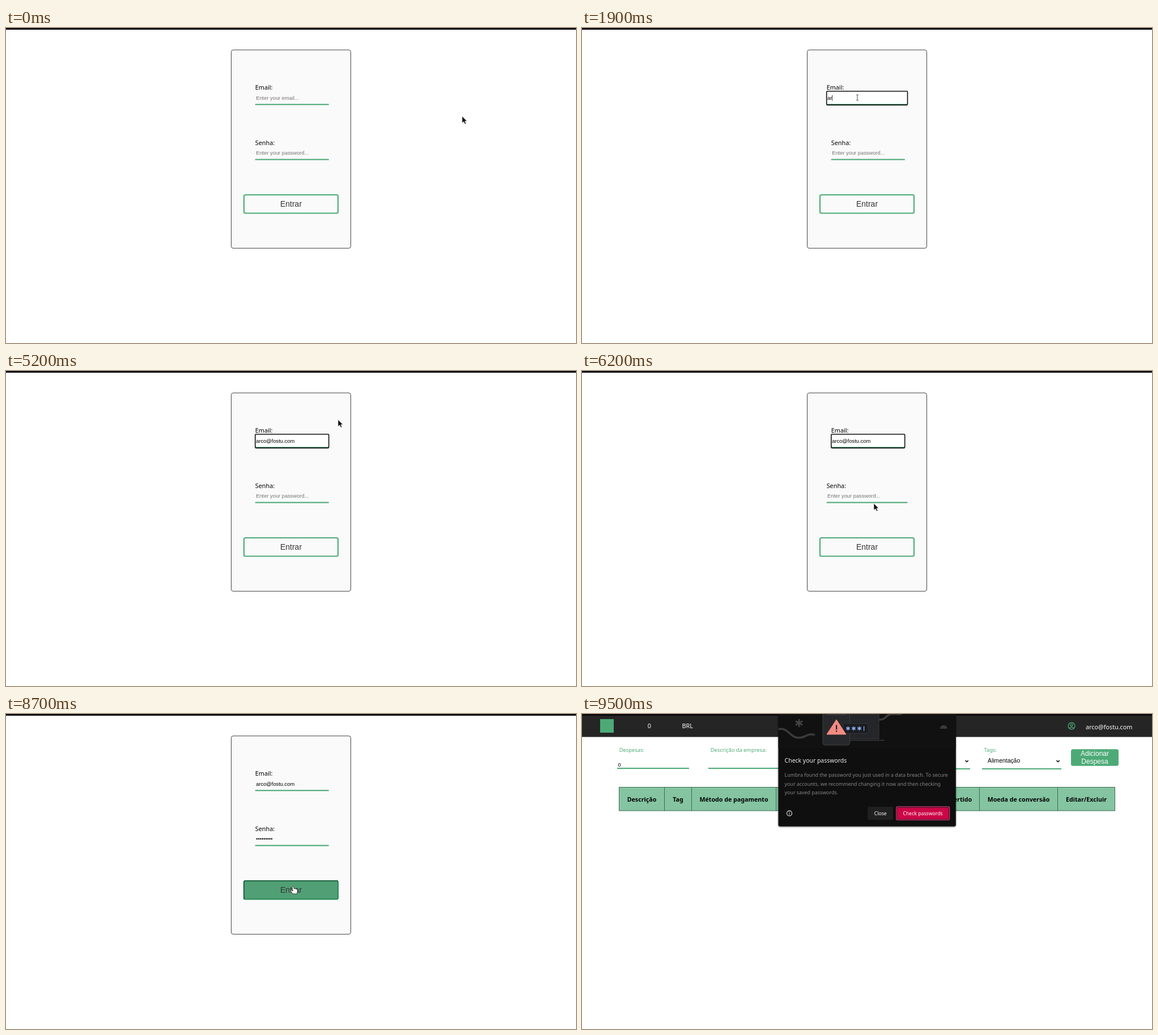
These frames come from a looping animation (1006x557 px, 9600 ms). An HTML page:

```html
<!DOCTYPE html>
<html lang="pt-BR">
<head>
<meta charset="utf-8">
<style>
html, body { margin: 0; width: 100%; height: 100%; overflow: hidden; background: #fff; }
svg { display: block; font-family: "Noto Sans", sans-serif; }
.ui { font-family: "Liberation Sans", Arial, sans-serif; }
.mid { text-anchor: middle; }
.bold { font-weight: 700; }
.medium { font-weight: 500; }
</style>
</head>
<body>
<svg id="stage" width="1006" height="557" viewBox="0 0 1006 557"></svg>
<script>
const LOOP = 9600, STEP = 100, GREEN = '#4daa77', FONT = 9.333;
const EMAIL = 'arco@fostu.com';
const SUGGESTIONS = ['tilverafristooficio@vumel.com', 'tilverafristo@correvo.com',
  'Tilverafristo@correvo.com', 'plonar@fostu.com', 'fostu@fostu.com', 'tulverfristo@zubeo.com.br'];
const EMAIL_KEYS = [1700, 1900, 2000, 2200, 2600, 3100, 3300, 3500, 3600, 3800, 4200, 4500, 4600, 4700];
const PASSWORD_KEYS = [7100, 7200, 7300, 7400, 7500, 7500, 7600, 7600, 7700];

// Pointer path: time, x, y
const PATH = [[100, 805, 156], [400, 690, 150], [800, 486, 123], [5100, 486, 123],
  [5200, 586, 86], [5300, 586, 86], [5600, 580, 145], [5900, 545, 215], [6200, 515, 234],
  [6300, 513, 226], [6500, 513, 222], [8000, 513, 222], [8100, 509, 299], [8400, 506, 305]];

const stage = document.getElementById('stage');
const pen = document.createElement('canvas').getContext('2d');
pen.font = FONT + 'px "Liberation Sans", Arial, sans-serif';

const text = (x, y, size, str, fill = '#000', cls = '') =>
  `<text x="${x}" y="${y}" font-size="${size}" fill="${fill}" class="${cls}">${str}</text>`;
const rect = (x, y, w, h, fill, extra = '') =>
  `<rect x="${x}" y="${y}" width="${w}" height="${h}" fill="${fill}" ${extra}/>`;
const line = (d, stroke, width = 1, extra = '') =>
  `<path d="${d}" fill="none" stroke="${stroke}" stroke-width="${width}" ${extra}/>`;
const at = (x, y, body) => `<g transform="translate(${x} ${y})">${body}</g>`;

function pointer(t) {
  const i = PATH.findIndex(p => p[0] > t);
  if (i === 0) return PATH[0].slice(1);
  if (i < 0) return PATH[PATH.length - 1].slice(1);
  const [a, b] = [PATH[i - 1], PATH[i]], k = (t - a[0]) / (b[0] - a[0]);
  return [a[1] + (b[1] - a[1]) * k, a[2] + (b[2] - a[2]) * k];
}

const cursors = {
  arrow: '<path d="M0 0V12.2L2.9 9.6 4.9 14 6.9 13.1 5 8.8H8.6Z" fill="#111" stroke="#fff" stroke-width=".6"/>',
  beam: line('M-2-5Q0-5 0-4Q0-5 2-5M0-4V4M-2 5Q0 5 0 4Q0 5 2 5', '#333', .9),
  hand: `<path d="M-1 1Q0-1.2 1.4 .6L2.6 4.2Q5 3 5.4 4.6Q7.5 4 7.6 5.6Q9 5.5 8.6 8L7.4 13H.6L-3.6 8.4
    Q-4.6 6.6-2.8 6.8L.4 8Z" fill="#fff" stroke="#222" stroke-width=".8" stroke-linejoin="round"/>`
};

function field(t, y, label, hint, value, keys, focusAt, blurAt, hover) {
  const focused = t >= focusAt && t < blurAt;
  const [left, right] = hover ? [431.7, 574.5] : [439.8, 569.7];
  const tx = left + 1.4;
  const shown = value.slice(0, keys.filter(k => k <= t).length);
  let out = text(left, 12.3, 10.8, label) +
    (focused ? rect(left, 14.5, right - left, 24, '#fff') : '') +
    rect(left, 37, right - left, 2.1, GREEN) +
    text(tx, 29.6, FONT, shown || hint, shown ? '#000' : '#757575', 'ui');
  if (focused) {
    const last = Math.max(focusAt + 200, ...keys.filter(k => k <= t));
    out += rect(left, 14.5, right - left, 24.4, 'none', 'rx="1.6" stroke="#101010" stroke-width="1.6"');
    if (t < last || (t - last) % 1000 < 500)
      out += rect(tx + pen.measureText(shown).width, 21.5, .8, 10, '#000');
  }
  return at(0, y, out);
}

function suggestions() {
  return rect(431.7, 137.3, 159.5, 162, '#0f0f0f', 'rx="2.5" filter="drop-shadow(0 1px 1px #0005)"') +
    SUGGESTIONS.map((s, i) => text(440, 158 + i * 25.2, 9.5, s, '#eee', 'medium')).join('');
}

function submitButton(hover, pressed) {
  const edge = line('M419.9 327.5V297Q419.9 295 422 295H586', '#1f5b3d', 1.6);
  return rect(420, 295, 166, 32.5, hover ? '#509f75' : '#fafafa',
    `rx="2.5" stroke="${pressed ? '#238a59' : GREEN}" stroke-width="2.1"`) +
    (pressed ? edge : '') + text(503, 316.4, 14, 'Entrar', '#333', 'ui mid');
}

function login(t) {
  const [x, y] = pointer(t);
  const over = (top, bottom) => x > 431 && x < 575 && y > top && y < bottom;
  const onButton = x > 419 && x < 587 && y > 294 && y < 329;
  const shape = onButton ? 'hand' : over(111, 136) || over(208, 233.5) ? 'beam' : 'arrow';
  return rect(397.5, 38.8, 211, 350.6, '#fafafa', 'rx="3.5" stroke="#444"') +
    field(t, 97.2, 'Email:', 'Enter your email...', EMAIL, EMAIL_KEYS, 1100, 6800, over(100, 136)) +
    field(t, 194.5, 'Senha:', 'Enter your password...', '•'.repeat(9), PASSWORD_KEYS, 6800, 8700, over(198, 236)) +
    submitButton(onButton, t >= 8700) +
    (t >= 1100 && t < 1800 ? suggestions() : '') +
    at(x, y, cursors[shape]);
}

function select(x, label, value) {
  return text(x + 3.5, 66.5, 9.3, label, GREEN) + rect(x, 96, 140, 2, GREEN) +
    text(x + 10, 86.4, 10.4, value, '#000', 'ui') +
    line(`M${x + 131.5} 82l2.6 2.7 2.6-2.7`, '#000', 1.5);
}

function input(x, label, value) {
  return text(x + 3.8, 67, 9.3, label, GREEN) + rect(x, 95, 127, 2.1, GREEN) +
    text(x + 1.5, 92.5, FONT, value, '#000', 'ui');
}

function table() {
  const heads = ['Descrição', 'Tag', 'Método de pagamento', 'Valor', 'Moeda', 'Câmbio utilizado',
    'Valor convertido', 'Moeda de conversão', 'Editar/Excluir'];
  const edges = [65.5, 145.5, 193.5, 342.5, 401.5, 467.5, 586.5, 701.5, 839.5, 940.5];
  return heads.map((h, i) =>
    rect(edges[i], 129.5, edges[i + 1] - edges[i], 41.5, '#85c4a1', 'stroke="#3b6b51"') +
    text((edges[i] + edges[i + 1]) / 2, 154.6, 10.7, h, '#000', 'bold mid')).join('');
}

function wallet(t) {
  const ready = t >= 9100;
  return rect(0, 3, 1006, 37.6, '#252525') + rect(32, 9, 24, 24, GREEN) +
    text(115.7, 25.2, 10.8, '0', '#fff') + text(176.5, 25.2, 10.8, 'BRL', '#fff') +
    text(889, 26.6, 10.8, EMAIL, '#fff') +
    at(864, 21, `<circle r="5.9" fill="none" stroke="${GREEN}" stroke-width="1.3"/>
      <circle cy="-1.4" r="2" fill="none" stroke="${GREEN}" stroke-width="1.2"/>` +
      line('M-4 4Q0 .6 4 4', GREEN, 1.2)) +
    input(62, 'Despesas:', '0') + input(223, 'Descrição da empresa:', '') +
    select(384, 'Moeda:', ready ? 'USD' : '') + select(545, 'Método de pagamento:', 'Dinheiro') +
    select(706, 'Tags:', 'Alimentação') +
    rect(863, 62.3, 84, 29.5, GREEN, 'rx="3.5"') +
    text(905, 74, 12, 'Adicionar', '#fff', 'ui mid') + text(905, 88, 12, 'Despesa', '#fff', 'ui mid') +
    table();
}

function star(x, y, r, color, width) {
  const arms = [0, 1, 2].map(i => {
    const a = Math.PI / 2 + i * Math.PI / 3, c = r * Math.cos(a), s = r * Math.sin(a);
    return `M${x - c} ${y - s}L${x + c} ${y + s}`;
  });
  return line(arms.join(''), color, width);
}

function dialog(ring) {
  const notice = ['Lumbra found the password you just used in a data breach. To secure',
    'your accounts, we recommend changing it now and then checking', 'your saved passwords.'];
  return rect(346.5, -6, 313.3, 204.8, '#0f0f0f', 'rx="3" filter="drop-shadow(0 1px 1.5px #0008)"') +
    rect(346.5, 0, 313.3, 60, '#111') +
    line('M347 27C363 22 367 43 384 42C395 42 397 33 411 37', '#3b3b3b', 3.5) +
    line('M524 10C538 10 536 1 546 0S560 2 565-1', '#3b3b3b', 3.5) +
    star(383, 16, 7, '#444', 2.6) +
    '<path d="M632 26A6.3 6.3 0 0 1 644.6 26Z" fill="#3b3b3b"/>' +
    rect(440, -5, 84, 49, '#252629', 'stroke="#38393c"') + line('M440 46.5H534', '#3b3b3b', 1.4) +
    rect(425, -5, 47.5, 60, '#27282b', 'rx="4" stroke="#3d3e41"') + line('M431 1H466', '#414245') +
    rect(461, 17, 44, 17, '#1b1c20', 'stroke="#34353a"') +
    [469.5, 479.5, 489.5].map(x => star(x, 25.5, 3.8, '#8ab4f8', 1.5)).join('') +
    rect(497, 21.5, 1.2, 8.5, '#8ab4f8') +
    '<path d="M449 10L466 36H432Z" fill="#f28b82" stroke="#f28b82" stroke-linejoin="round"/>' +
    rect(448, 19.5, 2.2, 8, '#202124') + rect(448, 29.3, 2.2, 2.2, '#202124') +
    text(357.6, 85.5, 10.45, 'Check your passwords', '#eee') +
    notice.map((s, i) => text(357.6, 111.2 + i * 15.5, 8.85, s, '#858585')).join('') +
    '<circle cx="366" cy="175.6" r="4.5" fill="none" stroke="#eee" stroke-width="1.1"/>' +
    rect(365.5, 174.8, 1, 3.2, '#eee') + rect(365.5, 172.8, 1, 1.1, '#eee') +
    rect(504.3, 164, 44.7, 23.3, '#202020', 'rx="2"') +
    text(526.7, 178.6, 8.7, 'Close', '#fff', 'medium mid') +
    (ring ? rect(554.8, 163.9, 93.8, 23.4, 'none', 'rx="2.5" stroke="#d43b78" stroke-width="1.3"') : '') +
    rect(556.2, 165.4, 91, 20.5, '#cb0647', 'rx="1.5"') +
    text(601.6, 178.6, 8.7, 'Check passwords', '#fff', 'medium mid');
}

function scene(t) {
  const page = t < 8900 ? login(t) : wallet(t);
  return page + rect(0, 0, 1006, 3, '#0d0a0f') + (t >= 9300 ? dialog(t >= 9500) : '');
}

let shown = -1;
function tick() {
  const t = Math.floor(performance.now() % LOOP / STEP) * STEP;
  if (t !== shown) stage.innerHTML = scene(shown = t);
  requestAnimationFrame(tick);
}
tick();
</script>
</body>
</html>
```
